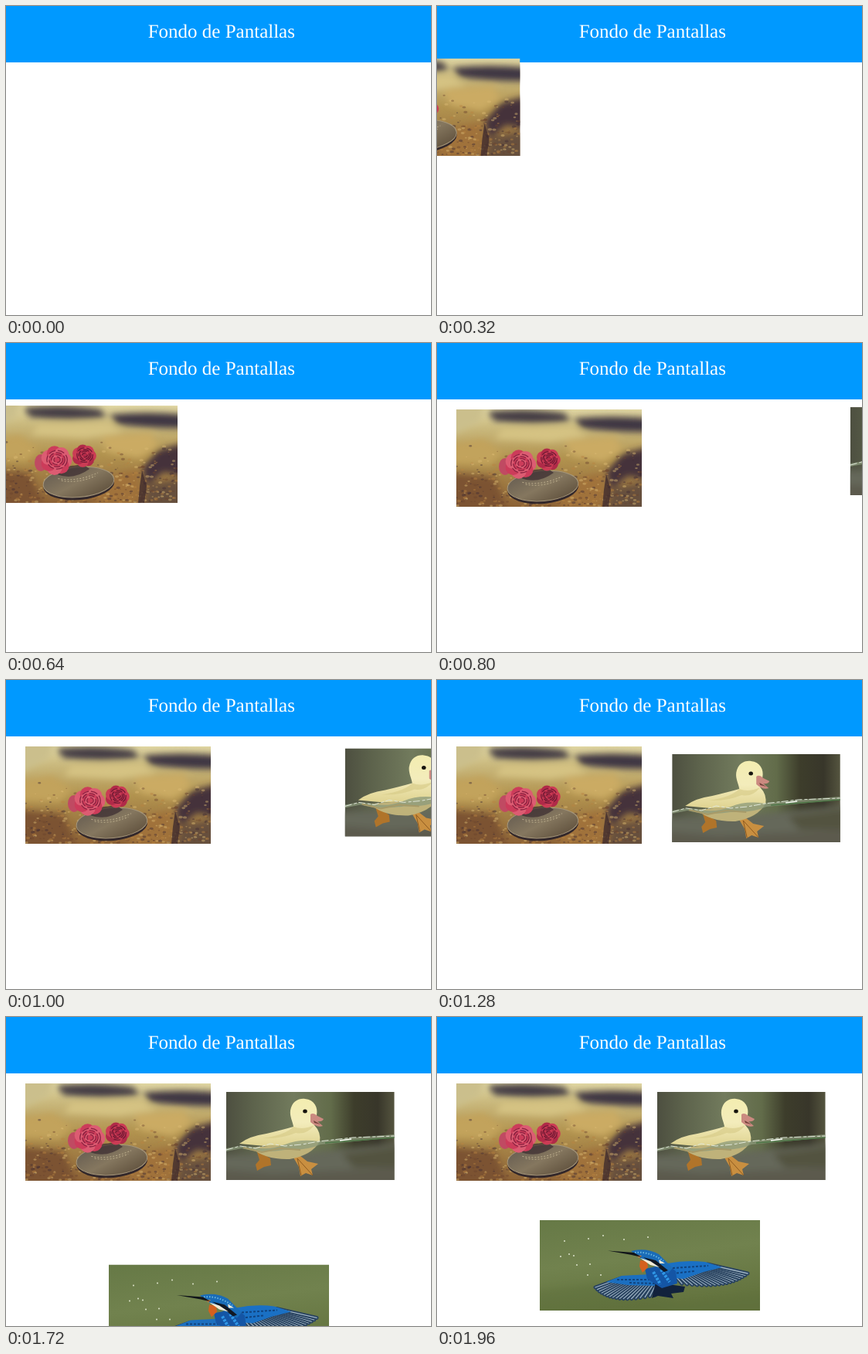
An HTML page that plays this animation: 550 px wide and 400 px high, repeating every 2 s.

```html
<!DOCTYPE html>
<html lang="es">
<head>
<meta charset="utf-8">
<title>Fondo de Pantallas</title>
<style>
html, body { margin: 0; width: 100%; height: 100%; overflow: hidden; background: #fff; }
body > svg { display: block; }
text { font: 25px "Liberation Serif", "Times New Roman", serif; fill: #fff; text-rendering: geometricPrecision; }
</style>
</head>
<body>
<svg width="550" height="400">
  <defs>
    <filter id="soft" x="-50%" y="-50%" width="200%" height="200%"><feGaussianBlur stdDeviation="4"/></filter>
    <filter id="fine" x="-20%" y="-20%" width="140%" height="140%"><feGaussianBlur stdDeviation=".6"/></filter>
    <linearGradient id="stone" x2="0" y2="1">
      <stop offset="0" stop-color="#e0d6a2"/><stop offset=".2" stop-color="#c9b87c"/>
      <stop offset=".5" stop-color="#b2934f"/><stop offset="1" stop-color="#8c6236"/>
    </linearGradient>
    <linearGradient id="pond">
      <stop offset="0" stop-color="#4d4f40"/><stop offset=".16" stop-color="#5d634c"/>
      <stop offset=".4" stop-color="#727b5d"/><stop offset=".62" stop-color="#626c4a"/>
      <stop offset=".76" stop-color="#3d3d2b"/><stop offset=".9" stop-color="#38362a"/><stop offset="1" stop-color="#55553f"/>
    </linearGradient>
    <linearGradient id="river" x2=".3" y2="1">
      <stop offset="0" stop-color="#667946"/><stop offset=".5" stop-color="#71824e"/><stop offset="1" stop-color="#64743f"/>
    </linearGradient>
    <linearGradient id="down" x2="0" y2="1">
      <stop offset="0" stop-color="#f3edb0"/><stop offset=".5" stop-color="#f3ecbb"/><stop offset="1" stop-color="#dfd391"/>
    </linearGradient>
    <linearGradient id="coin" y2="1">
      <stop offset="0" stop-color="#62594f"/><stop offset=".5" stop-color="#85775f"/><stop offset="1" stop-color="#584936"/>
    </linearGradient>
  </defs>

  <rect width="550" height="73" fill="#09f"/>
  <text x="183.7" y="41">Fondo de Pantallas</text>

  <svg id="roses" width="240" height="126">
    <rect width="240" height="126" fill="url(#stone)"/>
    <g filter="url(#soft)">
      <path d="M-9-9H40L30 16-9 36z" fill="#cbbf8c"/>
      <path d="M40 3Q90-3 140 5L148 15Q100 21 50 15z" fill="#443d45"/>
      <path d="M152 12Q200 7 250 12V29Q205 30 162 24z" fill="#3c3642"/>
      <path d="M60 24 150 22 170 34 120 42 50 38z" fill="#d5c383"/>
      <path d="M-9 46 35 38 60 56 45 72-9 70z" fill="#c2a35b"/>
      <path d="M140 40 205 36 215 52 190 68 150 60z" fill="#cbab63"/>
      <path d="M214 58 250 48V92L222 86 200 104 194 82z" fill="#45333a"/>
      <path d="M202 102 250 94V134H196z" fill="#66503c"/>
      <path d="M-8 82 50 88 68 134H-8z" fill="#7b5233"/>
      <path d="M150 92 190 82 190 128 130 128z" fill="#a0723b"/>
    </g>
    <g id="grain" filter="url(#fine)"></g>
    <path d="M194 84 200 104 197 126H189L191 104z" fill="#35232b" opacity=".7" filter="url(#fine)"/>
    <g transform="rotate(-5 112 100)">
      <ellipse cx="112" cy="102" rx="46" ry="20" fill="#32272a"/>
      <ellipse cx="112" cy="99" rx="46" ry="19.5" fill="url(#coin)" stroke="#a5967a"/>
      <path d="M86 92Q110 99 138 89M90 95Q110 101 134 93" fill="none" stroke="#b8aa8a" stroke-dasharray="2 2"/>
    </g>
    <path d="M82 88Q104 98 126 82L118 76 86 80z" fill="#3a2b30" opacity=".7" filter="url(#fine)"/>
    <g id="blooms"></g>
  </svg>

  <svg id="duck" width="217.5" height="114">
    <rect width="218" height="114" fill="url(#pond)"/>
    <g filter="url(#soft)">
      <path d="M-9 82 90 80 226 66V125H-9z" fill="#65675a"/>
      <path d="M-9 100 60 106 226 98V125H-9z" fill="#5b5a4d"/>
      <path d="M150 80 225 70V98H165z" fill="#53533f"/>
    </g>
    <path d="M39 75 46 74Q49 82 57 86L58 95 49 97 40 102 38 94 43 88z" fill="#b0742a"/>
    <path d="M87 85 96 83 105 90 119 93 110 100 112 108 103 105 96 109 94 97z" fill="#c98f40"/>
    <path d="M92 86 112 108M92 86 97 108" stroke="#8f5b20" fill="none"/>
    <path d="M32 72Q50 88 82 87 111 82 121 64z" fill="#bfb27a"/>
    <path d="M17 67Q30 57 52 54 73 49 87 45C86 38 82 32 83 24 85 12 94 8 102 9 114 10 119 20 117 30L114 43Q123 52 121 65L90 68 50 70z" fill="url(#down)"/>
    <path d="M87 45Q99 50 114 43 104 56 90 53 72 61 47 60 76 56 87 45z" fill="#d6ca86" opacity=".6" filter="url(#fine)"/>
    <path d="M109 29Q113 26 118 31L126 35Q124 39 118 38L125 44Q118 47 109 39z" fill="#cb8a80"/>
    <path d="M113 37 122 42 114 40z" fill="#703f38"/>
    <ellipse cx="102" cy="25" rx="2.8" ry="2.5" fill="#17150f"/>
    <path d="M0 73Q20 68 38 72T76 68 120 64L166 59 218 55V59L166 64 122 68Q105 76 76 75 45 80 20 73L0 77z" fill="#8b9a7b" opacity=".75"/>
    <path d="M0 75 18 70 38 73 57 67 76 70 98 68 120 64 164 59 218 57" fill="none" stroke="#dfe6d8" stroke-dasharray="9 3 4 2"/>
    <path d="M22 72 46 78 70 73 96 75" fill="none" stroke="#a79a68" stroke-width="2"/>
    <path d="M128 66 218 59" stroke="#4d7546" stroke-width="1.5"/>
    <path d="M147 63 162 61" stroke="#f5faf2" stroke-width="1.5"/>
  </svg>

  <svg id="bird" width="285" height="117">
    <rect width="285" height="117" fill="url(#river)"/>
    <path d="M-9 92 90 80 180 107 294 95V130H-9z" fill="#596a38" opacity=".3" filter="url(#soft)"/>
    <g id="drops" fill="#e7ecd7"></g>
    <g id="wings"></g>
    <path d="M165 56Q190 51 214 54L236 61 212 67 186 76 164 74z" fill="#1a70c4"/>
    <path d="M142 70 106 72 86 80 114 84 152 85z" fill="#1b6fc0"/>
    <path d="M172 62 218 59M172 69 200 66M100 77 146 77M116 81 150 82" stroke="#10437f" stroke-width="2" stroke-dasharray="3 2"/>
    <path d="M150 80 166 83 188 86 186 93 170 95 173 101 153 98 145 101z" fill="#12223c"/>
    <path d="M136 63 165 57 176 66 178 82 158 88 139 76z" fill="#1455a5"/>
    <path d="M147 67 156 83M157 64 168 80" stroke="#2f97e6" stroke-width="4" stroke-dasharray="3 1.5"/>
    <path d="M118 40Q138 35 154 44L172 62 166 69 147 59 128 48z" fill="#1a6cb8"/>
    <path d="M123 42Q142 40 160 53" fill="none" stroke="#6cb8de" stroke-width="2" stroke-dasharray="1.5 2"/>
    <path d="M130 52 139 53 140 61 133 68 129 60z" fill="#d4601f"/>
    <path d="M134 48 150 52 166 65 161 67 148 57z" fill="#111824"/>
    <path d="M130 49 143 53 155 61 143 58zM154 51 162 56 155 56z" fill="#f2ebd7"/>
    <path d="M124 45 132 46 129 49z" fill="#da8235"/>
    <path d="M88 39.5 122 42 132 48 119 45z" fill="#11151a"/>
  </svg>
</svg>
<script>
const el = id => document.getElementById(id);
let seed = 7;
const rand = () => (seed = seed * 16807 % 2147483647) / 2147483647;
const repeat = (n, make) => Array.from({length: n}, (_, i) => make(i)).join("");
const mix = (a, b, t) => a + (b - a) * t;

el("grain").innerHTML = repeat(420, () => {
  const x = rand() * 240, y = 44 + 82 * Math.sqrt(rand()), size = .6 + rand() * 1.6;
  const tone = ["#3f2a33", "#6a432c", "#dcbb74", "#b98240"][Math.floor(rand() * 4)];
  return `<ellipse cx="${x}" cy="${y}" rx="${size * 1.3}" ry="${size * .8}" fill="${tone}" opacity=".45"/>`;
});

// A bloom is a ring of petals around nested, off-centre folds.
function bloom(x, y, r, tones) {
  const petals = repeat(7, i => {
    const a = i * Math.PI / 3.5;
    return `<circle cx="${x + Math.cos(a) * r * .52}" cy="${y + Math.sin(a) * r * .45}" r="${r * .5}" fill="${tones[i % 2]}"/>`;
  });
  const folds = repeat(4, i => `<ellipse cx="${x + 1}" cy="${y - 1}" rx="${r * (.66 - i * .15)}" ry="${r * (.6 - i * .14)}"
    fill="${tones[i % 2]}" stroke="${tones[2]}" stroke-width="1.3" stroke-dasharray="${9 - i} 3"/>`);
  return petals + folds;
}
el("blooms").innerHTML =
  `<ellipse cx="63" cy="74" rx="8" ry="11" fill="#c04a62"/>` +
  bloom(83, 71, 20, ["#dc5c72", "#cc3c5a", "#8a2240"]) +
  bloom(119, 65, 15.5, ["#cb3c55", "#b02a48", "#6f1a34"]);

// Feathers run from a straight root line to a curved trailing edge.
function fan(n, [x0, y0, x1, y1], [ax, ay, bx, by, cx, cy]) {
  return repeat(n, i => {
    const t = i / (n - 1);
    const x = mix(mix(ax, bx, t), mix(bx, cx, t), t), y = mix(mix(ay, by, t), mix(by, cy, t), t);
    const line = `d="M${mix(x0, x1, t)} ${mix(y0, y1, t)}L${x} ${y}" stroke-linecap="round"`;
    return `<path ${line} stroke="#28425f" stroke-width="5"/><path ${line} stroke="#9db2c2" stroke-width="1.3"/>`;
  });
}
el("wings").innerHTML =
  fan(18, [170, 66, 217, 57], [184, 82, 243, 90, 269, 69]) +
  fan(18, [155, 80, 105, 75], [149, 97, 92, 110, 72, 87]);

const drops = [[82, 20], [63, 24], [32, 27], [38, 44], [44, 46], [48, 58], [65, 57], [62, 71], [79, 71], [27, 47], [109, 25], [140, 22]];
el("drops").innerHTML = drops.map(([x, y]) => `<circle cx="${x}" cy="${y}" r=".9"/>`).join("");

// Each slide: id, first step, last step, start point, end point.
const slides = [
  ["roses", 0, 19, [-247, 55.1], [25, 86]],
  ["duck", 19, 33, [554, 82], [285, 97]],
  ["bird", 33, 49, [133, 416.3], [133, 263]]
];

function draw() {
  const step = Math.floor(performance.now() % 2000 / 40);
  for (const [id, first, last, from, to] of slides) {
    const p = Math.min(1, Math.max(0, (step - first) / (last - first)));
    ["x", "y"].forEach((axis, i) => el(id).setAttribute(axis, mix(from[i], to[i], p)));
  }
  requestAnimationFrame(draw);
}
draw();
</script>
</body>
</html>
```
